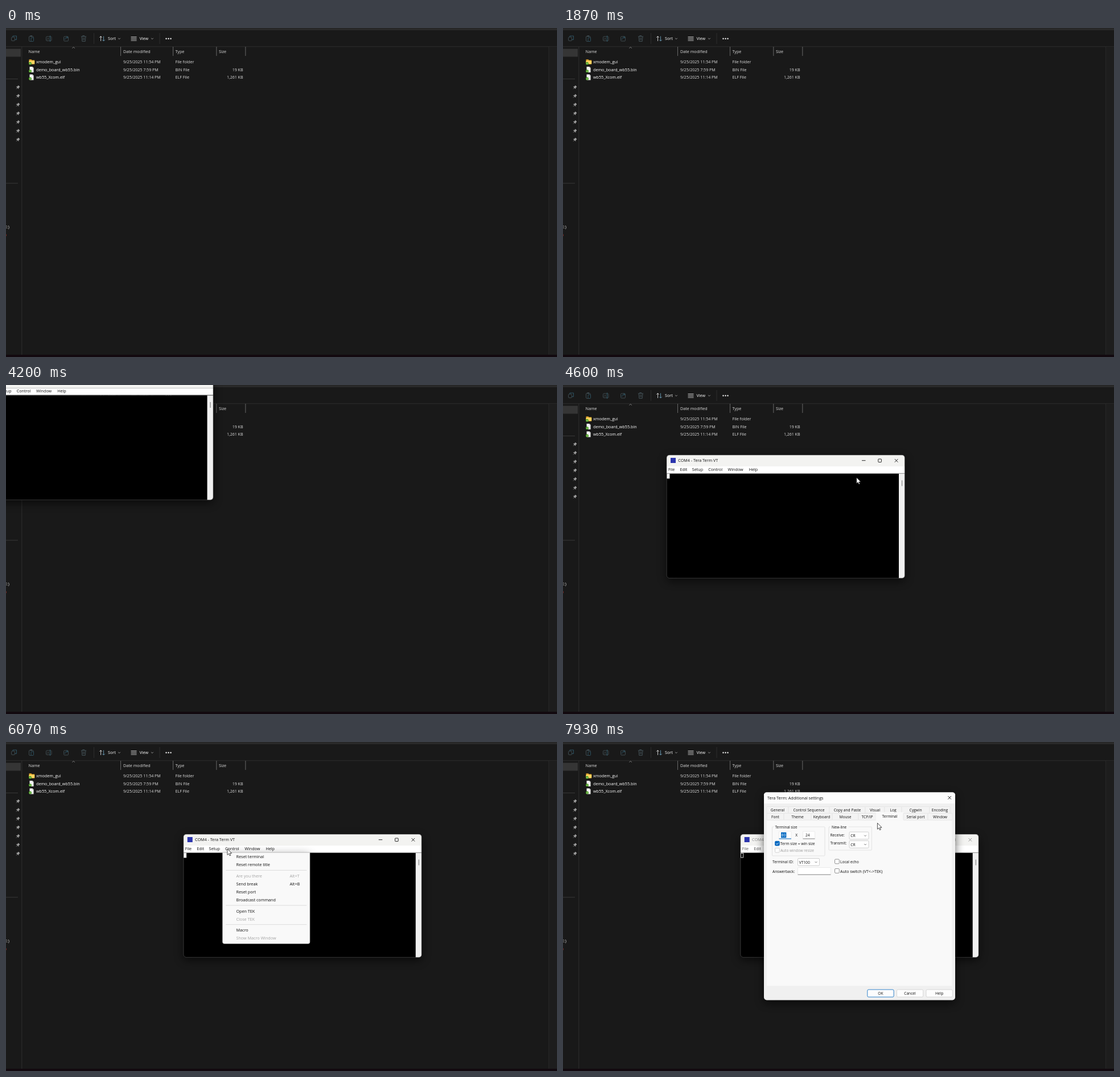
An HTML page for the animation above (8000 ms loop, 968x578 px).

```html
<!DOCTYPE html>
<html lang="en">
<head>
<meta charset="utf-8">
<title>Terminal setup</title>
<style>
html, body { margin: 0; width: 100%; height: 100%; overflow: hidden; background: #191919; }
svg { display: block; position: absolute; left: 0; top: 0; }
text { font-family: "Open Sans", "Noto Sans", sans-serif; white-space: pre; }
</style>
</head>
<body>
<svg id="stage" width="968" height="578" viewBox="0 0 968 578"></svg>
<script>
const LOOP = 8000, FRAME = 1000 / 15;

// Markup helpers
const rect = (x, y, w, h, fill, extra = '') =>
  `<rect x="${x}" y="${y}" width="${w}" height="${h}" fill="${fill}" ${extra}/>`;
const frame = (x, y, w, h, fill, stroke, r = 1.5) =>
  rect(x, y, w, h, fill, `stroke="${stroke}" stroke-width=".8" rx="${r}"`);
const line = (d, stroke, w = 1, extra = '') =>
  `<path d="${d}" fill="none" stroke="${stroke}" stroke-width="${w}" ${extra}/>`;
const esc = s => s.replace(/&/g, '&amp;').replace(/</g, '&lt;').replace(/>/g, '&gt;');
// cy is the middle of the text line
const text = (x, cy, s, fill, size = 7.2, anchor = 'start') =>
  `<text x="${x}" y="${cy + 2.6}" fill="${fill}" font-size="${size}" text-anchor="${anchor}">${esc(s)}</text>`;
const group = (id, body, extra = '') => `<g id="${id}" ${extra}>${body}</g>`;
const chevron = (x, y, c, s = 1.8) => line(`M${x - s} ${y - s / 2}l${s} ${s} ${s} ${-s}`, c, .8);
const shadow = (x, y, w, h, o = .6) => rect(x, y + 5, w, h, '#000', `rx="5" opacity="${o}" filter="url(#blur)"`);

function toolbar() {
  const dim = '#47565c', teal = '#2f5a6b', lit = '#d8d8d8';
  let s = frame(9.5, 16, 6, 6.5, 'none', dim) + line('M12 16v-2h6.5v6.5h-3', teal, .9);
  s += frame(40.5, 14.5, 7.5, 9, 'none', dim) + rect(42.5, 13.3, 3.5, 2, dim) + frame(44, 17, 4.5, 6.5, '#191919', teal, 1);
  s += frame(70.5, 15, 9.5, 7.5, 'none', dim) + text(72, 18.7, 'A', dim, 6) + line('M77.5 13.5v10.5', teal);
  s += frame(101.5, 15, 8, 8, 'none', dim) + line('M103.5 20.5c0-3 2-4 5-4m-2-2l2.3 2-2.3 2', teal, .9);
  s += line('M132 15h9M134.7 15v-1.5h3V15M133 15l.8 8.5h5.4l.8-8.5M135.4 17v4.500M137.600 17v4.500', dim, .9);
  s += line('M154.500 9v19M270 9v19', '#2e2e2e');
  s += line('M166.500 23v-8.500m-2.300 2.300l2.300-2.300 2.300 2.300', lit, .9) + line('M171.500 14.500v8.500m-2.300-2.300l2.300 2.300 2.300-2.300', '#6d9fb8', .9);
  s += text(179, 18.700, 'Sort', '#fff') + chevron(199, 18.700, '#bbb');
  s += line('M219.500 15.500h10m-10 2.200h10m-10 2.200h10m-10 2.200h10', lit, .8);
  s += text(234.5, 18.7, 'View', '#fff') + chevron(257, 18.7, '#bbb');
  for (const x of [281.5, 285.5, 289.5]) s += `<circle cx="${x}" cy="18.8" r="1.2" fill="#eee"/>`;
  return s;
}

function explorer() {
  let s = rect(0, 0, 968, 578, '#191919') + rect(0, 0, 968, 2.5, '#262626') + rect(0, 2.5, 968, 1, '#3b3b3b');
  s += toolbar() + rect(0, 32.3, 968, 1, '#303030');
  s += rect(953, 33, 15, 541, '#1d1d1d') + rect(953, 33, 1, 541, '#272727');
  s += rect(27.3, 33, 1, 541, '#303030') + rect(0, 36.5, 26, 14, '#353535');
  s += rect(0, 89, 21, 1, '#383838') + rect(0, 272.3, 21, 1, '#383838');
  for (let i = 0; i < 7; i++)
    s += `<path transform="translate(20.5 ${104.6 + i * 15.33}) rotate(45) scale(.85)" fill="#a0a0a0" stroke="#a0a0a0" stroke-width=".7" d="M-2-4h4l-.5 3L3 .6h-6L-1.500-1zM0 .6v3.600"/>`;
  s += text(6, 349, '(E:)', '#ddd', 7.2, 'end') + rect(0, 362.500, 1, 3, '#7a2a26');
  for (const x of [201.5, 293.5, 369.8, 420.8]) s += rect(x - .5, 33, 1, 16, '#686868');
  s += line('M116.300 35.600l2.300-2 2.300 2', '#999', .8);
  [[39.5, 'Name'], [206, 'Date modified'], [297.5, 'Type'], [374, 'Size']]
    .forEach(([x, t]) => s += text(x, 41.2, t, '#dedede'));
  [['xmodem_gui', '9/25/2025 11:54 PM', 'File folder', ''],
   ['demo_board_wb55.bin', '9/25/2025 7:59 PM', 'BIN File', '19 KB'],
   ['wb55_Xcom.elf', '9/25/2025 11:14 PM', 'ELF File', '1,261 KB']].forEach((row, i) => {
    const y = 59.7 + i * 13.4;
    s += i
      ? `<path d="M41.500 ${y - 5}h5l2 2v8h-7z" fill="#f4f4f4"/>` + line(`M46.500 ${y - 5}v2h2`, '#aaa', .6)
      : `<path d="M40.500 ${y - 4.500}h4l1.200 1.300h4.500v7h-9.700z" fill="#e3a52a"/>` + rect(40.5, y - 2.2, 9.7, 5.7, '#ffd562', 'rx=".7"');
    s += `<circle cx="42.500" cy="${y + 2.600}" r="2.500" fill="#4aa01f"/>` + line(`M41.300 ${y + 2.600}l.9.900 1.600-1.800`, '#fff', .7);
    s += text(53, y, row[0], '#fff') + text(206, y, row[1], '#dedede', 7.05) +
      text(297.5, y, row[2], '#dedede', 7.1) + text(416.5, y, row[3], '#dedede', 7.05, 'end');
  });
  return s + rect(0, 574, 968, 4, '#12090f');
}

function terminal() {
  const controls = '<g stroke="currentColor" fill="none" stroke-width=".9"><path d="M343 9.700h6.500M400.800 7l5.600 5.600m0-5.600l-5.600 5.600"/><rect x="371.800" y="7" width="5.600" height="5.600" rx=".8"/></g>';
  let s = rect(0, 0, 418.5, 20, '#f3f3f1') + rect(0, 20, 418.5, 12, '#fff') + rect(7, 5, 9, 9, '#2c35ad');
  s += text(20.3, 9.6, 'COM4 - Tera Term VT', 'currentColor') + controls;
  s += '<g id="bar">' + [[3, 'File'], [23.5, 'Edit'], [44.8, 'Setup'], [73.2, 'Control'], [107.6, 'Window'], [144.7, 'Help']]
    .map(([x, t]) => text(x, 25.3, t, 'currentColor')).join('') + '</g>';
  s += rect(0, 31.8, 418.5, 1.2, '#9a9a9a') + rect(0, 33, 408, 183.5, '#000') + rect(408, 33, 10.5, 183.5, '#f0f0f0');
  s += rect(413, 44.5, 1.1, 10, '#7d7d7d') + rect(.8, 33.3, 4.2, 7.7, '#fff', 'id="block" stroke="#fff" stroke-width=".8"');
  return shadow(0, 0, 418.5, 216.5) + `<g clip-path="url(#round)">${s}</g>` +
    rect(.2, .2, 418.1, 216.1, 'none', 'rx="5" stroke="#666" stroke-width=".5"');
}

// Items starting with '~' are disabled, '-' is a separator, '|' splits off the shortcut
function menu(x, w, h, items) {
  let y = 201.7;
  let s = shadow(x, 192, w, h, .35) +
    `<path d="M${x} 194.300h${w}v${h - 3}q0 3-3 3h${6 - w}q-3 0-3-3z" fill="#f9f9f9" stroke="#cfcfcf" stroke-width=".6"/>`;
  for (const it of items) {
    if (it === '-') { s += rect(x + 5.5, y - 4.8, w - 11, .9, '#d9d9d9'); y += 5.7; continue; }
    const [label, key] = it.replace('~', '').split('|'), c = it[0] === '~' ? '#a3a3a3' : '#111';
    s += text(x + 24, y, label, c) + (key ? text(x + 118, y, key, c) : '');
    y += 14;
  }
  return s;
}

function dialog() {
  const ink = '#111', edge = '#dcdcdc', size = 6.65;
  const label = (x, y, t, c = ink, f = size) => text(x, y, t, c, f);
  const box = (x, y, c = '#777') => frame(x, y, 7.8, 7.8, '#fdfdfd', c, 1.5);
  const field = (x, y, w, h, c = '#8a8a8a') => frame(x, y, w, h, '#fff', '#e6e6e6', 1) + rect(x, y + h - .5, w, 1, c);
  const combo = (x, y, w, t) => frame(x, y, w, 12.8, '#fefefe', '#c4c4c4') + label(x + 2.2, y + 6.6, t) + chevron(x + w - 6, y + 6.6, '#555');
  const legend = (x, y, w, h, t, tw) => frame(x, y, w, h, 'none', edge, 1) + rect(x + 3, y - 2, tw + 4, 4, '#f9f9f9') + label(x + 5, y, t, ink, 6.45);
  const tabs = (y, cuts, names) => names.map((t, i) => {
    const on = t === 'Terminal', up = on ? 1.5 : 0;
    return frame(cuts[i], y - up, cuts[i + 1] - cuts[i], 12 + up, on ? '#f9f9f9' : '#f3f3f3', on ? '#f9f9f9' : '#e4e4e4', .5) +
      text((cuts[i] + cuts[i + 1]) / 2, y + 6.2 - up, t, ink, size, 'middle');
  }).join('');
  const button = (x, t, c) => frame(x, 435, 46.3, 13, '#fdfdfd', c, 2) + text(x + 23.1, 441.6, t, ink, size, 'middle');

  let s = shadow(353, 88.5, 336, 365) + rect(353, 88.5, 336, 365, '#f0f0f0', 'rx="5"');
  s += `<path d="M353 108v-14.500q0-5 5-5h326q5 0 5 5V108z" fill="#fcfcfc"/>`;
  s += text(359, 98.2, 'Tera Term: Additional settings', ink, 7.15) + line('M676.300 95l5.600 5.600m0-5.600l-5.600 5.600', ink, .9);
  s += rect(358, 136.5, 325, 292, '#f9f9f9');
  s += tabs(113.5, [358, 396, 468, 531, 565, 595, 644, 680],
    ['General', 'Control Sequence', 'Copy and Paste', 'Visual', 'Log', 'Cygwin', 'Encoding']);
  s += tabs(125.2, [358, 388, 436, 473, 519, 550, 598, 641, 684],
    ['Font', 'Theme', 'Keyboard', 'Mouse', 'TCP/IP', 'Terminal', 'Serial port', 'Window']);
  s += legend(367.5, 149, 92.5, 51, 'Terminal size', 39) + legend(467, 149, 75.3, 41, 'New-line', 28);
  s += field(379.5, 157, 21.5, 13, '#0067c0') + rect(383, 158.7, 9.3, 9.6, '#0067c0') + label(383.6, 163.6, '80', '#fff');
  s += label(408.3, 163.6, 'X') + field(421.5, 157, 21, 13) + label(426, 163.6, '24');
  s += frame(372.5, 174.300, 7.8, 7.8, '#0067c0', '#0067c0') + line('M374.300 178.300l1.600 1.700 2.800-3.200', '#fff', .9);
  s += label(381.8, 178.4, 'Term size = win size') + box(372.5, 186.3, '#c8c8c8') + label(382, 190.4, 'Auto window resize', '#9c9c9c', 6.5);
  s += label(469.5, 163.2, 'Receive:') + combo(503, 158, 34, 'CR') + label(469.5, 177.5, 'Transmit:') + combo(503, 173.4, 34, 'CR');
  s += label(368, 210.6, 'Terminal ID:') + combo(412.5, 204.5, 38, 'VT100') + box(477.5, 206) + label(487, 210.5, 'Local echo');
  s += label(368, 227, 'Answerback:') + field(412.5, 220.5, 58, 12.5) + box(477.5, 222.500) + label(487, 227, 'Auto switch (VT<->TEK)', ink, 7);
  return s + button(534.8, 'OK', '#0067c0') + button(586.4, 'Cancel', '#d0d0d0') + button(638, 'Help', '#d0d0d0');
}

function preview() {
  return rect(759.5, 502.5, 136, 90, '#2b2b2b', 'rx="5" stroke="#3f3f3f" stroke-width=".8"') +
    rect(766, 509, 9, 9, '#2c35ad') + text(779, 513.6, 'COM4 - Tera Term VT', '#fff') +
    rect(765, 524, 125, 65, '#000') + rect(765, 524, 125, 6, '#f3f3f1') + rect(765, 530, 125, 3.500, '#fff') + rect(887, 533.500, 3, 55, '#f0f0f0');
}

const controlItems = ['Reset terminal', 'Reset remote title', '-', '~Are you there|Alt+T', 'Send break|Alt+B',
  'Reset port', 'Broadcast command', '-', 'Open TEK', '~Close TEK', '-', 'Macro', '~Show Macro Window'];
const setupItems = ['Terminal...', 'Window...', 'Font', 'Keyboard...', 'Serial port...', 'Proxy...', 'SSH...',
  'SSH Authentication...', 'SSH Forwarding...', 'SSH KeyGenerator...', 'TCP/IP...', 'General...',
  'Additional settings...', '-', 'Save setup...', 'Restore setup...', 'Setup directory...', '-', 'Load key map...'];

const stage = document.getElementById('stage');
stage.innerHTML = `<defs><filter id="blur" x="-20%" y="-20%" width="140%" height="150%"><feGaussianBlur stdDeviation="8"/></filter>
  <clipPath id="round"><rect width="418.5" height="216.5" rx="5"/></clipPath></defs>` +
  explorer() + group('preview', preview()) + group('win', terminal()) +
  group('control', menu(380.5, 153.3, 160, controlItems)) +
  group('setup', menu(354, 130, 253, setupItems)) +
  group('pick', rect(354, 194.8, 130, 14.2, '#f0f0f0') + text(376.5, 201.7, 'Terminal...', '#111')) +
  group('dialog', dialog()) +
  group('mouse', '<path d="M.4.400v10.800l2.500-2.300 1.600 3.700 1.800-.8-1.600-3.600h3.300z" fill="#fff" stroke="#000" stroke-width=".7"/>');

const el = {};
for (const id of ['preview', 'win', 'bar', 'block', 'control', 'setup', 'pick', 'dialog', 'mouse'])
  el[id] = document.getElementById(id);

// Tracks: [time, value...], linear between the steps, held outside them
const winPath = [[4400, -54.5, -14.5], [4467, -32, -2], [4533, 70, 55], [4600, 182, 123], [4667, 255, 149], [4733, 299, 160], [4800, 311.7, 162]];
const mousePath = [[3533, 630, 495], [3667, 452, 300], [3800, 290, 115], [3933, 195, 12], [4000, 182, 0], [4133, 182, 0], [4200, 184, -14],
  [4400, 184, -14], [4467, 240, 12], [4533, 380, 88], [4600, 515.3, 162], [4667, 545, 172], [4733, 551, 173], [4933, 551, 173],
  [5000, 545, 177], [5200, 490, 200], [5267, 458, 203], [5400, 400, 193], [5467, 388.5, 187.2], [6067, 388.5, 187.2],
  [6133, 368, 187], [6200, 361, 187], [6400, 361, 187], [6600, 374, 196], [6733, 384, 201], [6867, 389, 203], [7000, 408, 222],
  [7133, 431.7, 246], [7200, 412, 257], [7267, 390, 261], [7533, 390, 261], [7600, 397, 255], [7667, 430, 229], [7733, 478, 194],
  [7800, 520, 164], [7867, 545, 147], [7933, 552, 142]];
const previewFade = [[1000, 0], [1067, .25], [1133, .55], [1200, .8], [1333, 1]];
const winFade = [[3200, 0], [3267, .35], [3333, .75], [3467, 1]];
const controlFade = [[5600, 0], [5667, .45], [5733, .85], [5800, 1]];
const setupFade = [[6067, 0], [6133, .7], [6200, 1]];
const pickFade = [[6867, 1], [6933, .9], [7133, .37], [7267, 0]];
const dialogFade = [[7200, 0, -6], [7267, .45, -4], [7333, .85, -1], [7400, 1, 0]];

function at(track, t) {
  const i = track.findIndex(k => k[0] > t);
  if (i === 0) return track[0].slice(1);
  if (i < 0) return track[track.length - 1].slice(1);
  const a = track[i - 1], b = track[i], p = (t - a[0]) / (b[0] - a[0]);
  return a.slice(1).map((v, j) => v + (b[j + 1] - v) * p);
}
const move = (g, x, y, more = '') => g.setAttribute('transform', `translate(${x} ${y})${more}`);
const fade = (g, o) => {
  g.setAttribute('opacity', o);
  g.style.display = o > 0 ? '' : 'none';
};

function draw(time) {
  const t = Math.round(Math.floor((time + 4) / FRAME) * FRAME);

  const pv = at(previewFade, t)[0];
  fade(el.preview, t < 1867 ? pv : 0);
  move(el.preview, 0, 12 * (1 - pv));

  const open = at(winFade, t)[0], [wx, wy] = at(winPath, t), k = .9 + .1 * open;
  fade(el.win, open);
  move(el.win, wx, wy, ` translate(209 108) scale(${k}) translate(-209 -108)`);
  const away = t >= 6933;
  el.win.setAttribute('color', away ? '#8c8c8c' : '#111');
  el.bar.setAttribute('color', away ? '#555' : '#111');
  el.block.setAttribute('fill', away ? '#000' : '#fff');
  el.block.style.display = t >= 4667 && t < 5200 ? 'none' : '';

  fade(el.control, t < 6133 ? at(controlFade, t)[0] : 0);
  fade(el.setup, t < 6933 ? at(setupFade, t)[0] : 0);
  fade(el.pick, t >= 6600 ? at(pickFade, t)[0] : 0);

  const [shown, dy] = at(dialogFade, t);
  fade(el.dialog, shown);
  move(el.dialog, 0, dy);

  const [mx, my] = at(mousePath, t);
  move(el.mouse, mx, my);
  el.mouse.style.display = t >= 3533 ? '' : 'none';
}

const start = performance.now();
function tick() {
  draw((performance.now() - start) % LOOP);
  requestAnimationFrame(tick);
}
tick();
</script>
</body>
</html>
```
